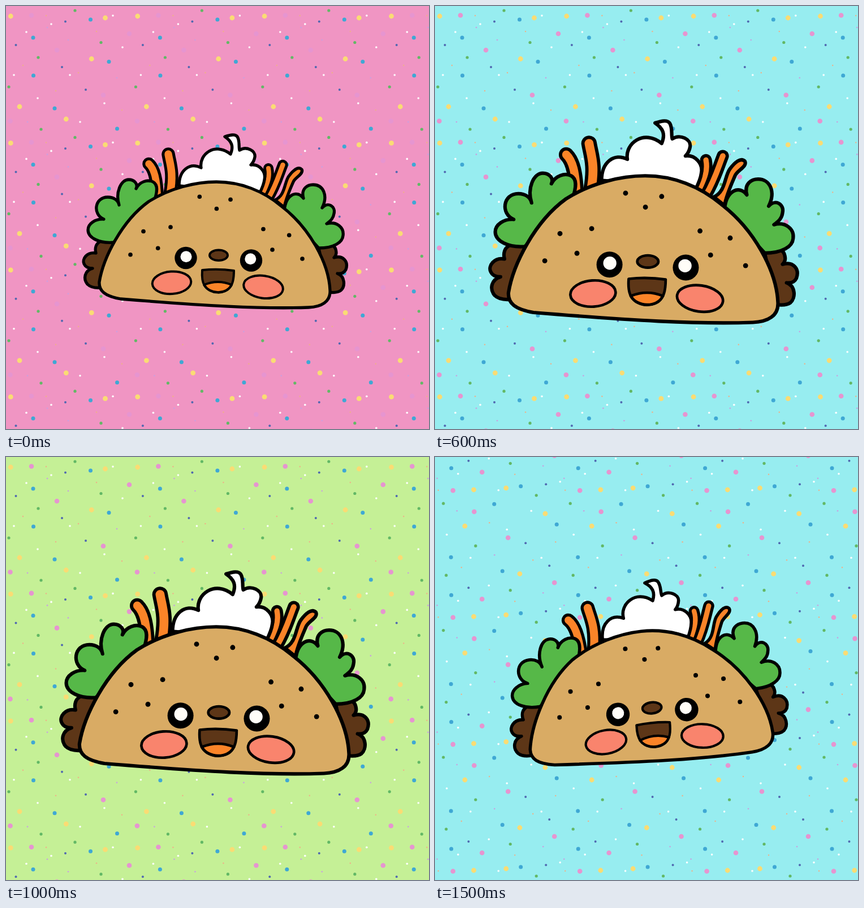
Recreate the animation shown at these times as an HTML page. Size 748x748 px, loop 1600 ms.

```html
<!DOCTYPE html>
<html lang="en">
<head>
<meta charset="utf-8">
<title>Bouncing taco</title>
<style>
html, body { margin: 0; width: 100%; height: 100%; overflow: hidden; }
svg { display: block; width: 100vw; height: 100vh; }
.line { stroke: #000; stroke-width: 5.3; stroke-linejoin: round; stroke-linecap: round; }
.face .line { stroke-width: 4; }
.shell { fill: #d9ab64; }
.leaf { fill: #56b848; }
.meat { fill: #5d3617; }
.carrot { fill: #fb8428; }
.cream { fill: #fff; }
.cheek { fill: #f9846d; }
.stick { fill: none; stroke-linecap: round; }
</style>
</head>
<body>
<svg viewBox="0 0 748 748">
  <defs><g id="tile"></g></defs>
  <rect id="back" width="748" height="748"/>
  <g id="confetti"></g>
  <g id="taco">
    <path class="line meat" d="M190 420C172 408 154 418 159 437C143 434 134 448 138 456C141 463 147 464 153 464C139 468 136 482 144 492C150 498 160 499 170 498Z"/>
    <path class="line meat" d="M553 428C565 419 583 418 584 436C584 440 582 443 580 445C596 440 606 452 601 466C598 472 593 474 586 473C600 478 600 496 592 503C587 507 578 507 570 506Z"/>
    <g id="sticks"></g>
    <path class="line carrot" d="M476 343C494 335 492 312 500 301C508 290 517 283 523 289C527 297 511 303 508 311C502 325 495 340 492 356Z"/>
    <path class="line leaf" d="M190 418C165 420 145 410 145 396C145 385 158 376 173 377C153 369 156 338 180 338C190 338 198 343 200 352C193 330 203 307 217 307C227 307 234 315 230 323C236 311 250 306 260 311C269 316 268 328 262 345Z"/>
    <path class="line leaf" d="M492 362C495 332 515 325 526 340C521 322 534 316 543 316C561 316 570 335 559 357C570 345 583 355 580 367C579 375 575 379 567 385C585 380 598 392 596 406C595 418 580 428 553 428Z"/>
    <path class="line cream" d="M306 318C306 290 325 276 345 286C341 262 370 240 397 262C403 248 399 239 387 231C397 228 405 226 409 231C414 239 411 248 413 255C425 247 442 256 440 267C439 273 437 277 433 281C448 279 460 293 457 307C456 316 452 324 448 332Z"/>
    <path class="line shell" d="M165 488C172 445 205 380 252 346C290 322 335 311 372 311C415 311 455 327 487 354C537 392 571 455 573 503C574 523 558 532 535 533C450 536 350 530 203 518C175 513 164 504 165 488Z"/>
    <g id="seeds"></g>
    <g class="face">
      <circle cx="318" cy="445.5" r="19.7"/>
      <circle cx="318.5" cy="443.3" r="10" fill="#fffdf8"/>
      <circle cx="433.5" cy="450" r="19.7"/>
      <circle cx="432.3" cy="447.2" r="10" fill="#fffdf8"/>
      <ellipse class="line meat" cx="376" cy="440.8" rx="16" ry="9.3"/>
      <ellipse class="line cheek" cx="293" cy="489.3" rx="34.3" ry="19.8" transform="rotate(-4 293 489.3)"/>
      <ellipse class="line cheek" cx="455" cy="496.8" rx="35" ry="19.8" transform="rotate(8 455 496.8)"/>
      <path class="meat" d="M347 467Q375 464 403 468C403 482 401 491 397 496C388 511 360 510 351 494C347 488 346 480 347 467Z"/>
      <path class="line carrot" d="M350 493Q375 483 399 493C390 511 360 510 350 493Z"/>
      <path class="line" fill="none" d="M347 467Q375 464 403 468C403 482 401 491 397 496C388 511 360 510 351 494C347 488 346 480 347 467Z"/>
    </g>
  </g>
</svg>
<script>
const $ = id => document.getElementById(id);
const NS = "http://www.w3.org/2000/svg";

function add(parent, tag, attrs) {
  const el = document.createElementNS(NS, tag);
  for (const key in attrs) el.setAttribute(key, attrs[key]);
  parent.append(el);
  return el;
}

function dots(parent, fill, r, points) {
  for (const [cx, cy] of points) add(parent, "circle", { cx, cy, r, fill });
}

// Confetti: one square tile, repeated over the stage
const TILE = 224.4;
const tile = $("tile");
dots(tile, "#c9a0e0", 1.3, [[73, 38], [196, 127], [110, 60], [38, 205]]);
dots(tile, "#efb088", 1.2, [[71, 17], [160, 45], [30, 105], [128, 118], [205, 184], [88, 150]]);
dots(tile, "#fff", 1.8, [[36, 46], [80, 32], [14, 122], [113, 122], [56, 163], [206, 73], [174, 172], [131, 205], [189, 17]]);
dots(tile, "#5068b0", 2, [[105, 27.5], [17.5, 69], [99, 108], [141, 148]]);
dots(tile, "#62b865", 2.6, [[122, 8], [168, 64.5], [57, 91], [5, 143], [62, 218]]);
dots(tile, "#3fa8d4", 3.5, [[149.5, 24], [48, 56], [182, 98.5], [48.5, 123], [86, 181], [196.5, 217]]);
dots(tile, "#e695d0", 4.3, [[45, 16.5], [218, 49], [90, 78], [172, 157.5], [7.5, 203.5]]);
dots(tile, "#fadc74", 4.4, [[8.3, 18], [175.5, 21], [151.3, 93.5], [24, 178], [106.3, 200]]);
for (let i = 0; i < 16; i++)
  add($("confetti"), "use", { href: "#tile", x: (i % 4) * TILE, y: (i >> 2) * TILE });

// Carrot sticks: a dark stroke with a thinner orange one on top
function stick(d, width) {
  add($("sticks"), "path", { d, class: "stick", stroke: "#000", "stroke-width": width + 10 });
  add($("sticks"), "path", { d, class: "stick", stroke: "#fb8428", "stroke-width": width });
}
stick("M252.5 279C262 288 267 305 268 342", 12.5);
stick("M287 262C290 280 297 295 290 332", 13.5);
stick("M464 287C467 302 463 312 454 332", 8);
stick("M489.5 281C482 300 478 316 464 340", 8.5);

dots($("seeds"), "#000", 3.8, [
  [342.3, 337.3], [397, 342.3], [372.4, 358.5], [291, 391], [243, 398.5], [268.7, 428.3],
  [220, 439.7], [455, 394.5], [500.7, 405.2], [471, 431], [524, 447]
]);

const COLORS = ["#f095c3", "#c5f096", "#c996f0", "#97edf0"];
const STEP = 100, COUNT = 16, GROWTH = 1.0531;

// Size and colour hold for two beats; the tilt flips on every beat
function draw(time) {
  const beat = Math.floor(time / STEP) % COUNT;
  const pair = beat >> 1;
  const odd = beat % 2;
  const size = GROWTH ** (4 - Math.abs(4 - pair));
  $("back").setAttribute("fill", COLORS[pair % 4]);
  $("confetti").setAttribute("transform", `rotate(${odd * 180} 375 374.5)`);
  $("taco").setAttribute("transform",
    `translate(374 375) rotate(${odd * -6.3}) scale(${size}) translate(-374 -375)`);
}

const start = performance.now();
function loop() {
  draw(performance.now() - start);
  requestAnimationFrame(loop);
}
loop();
</script>
</body>
</html>
```
